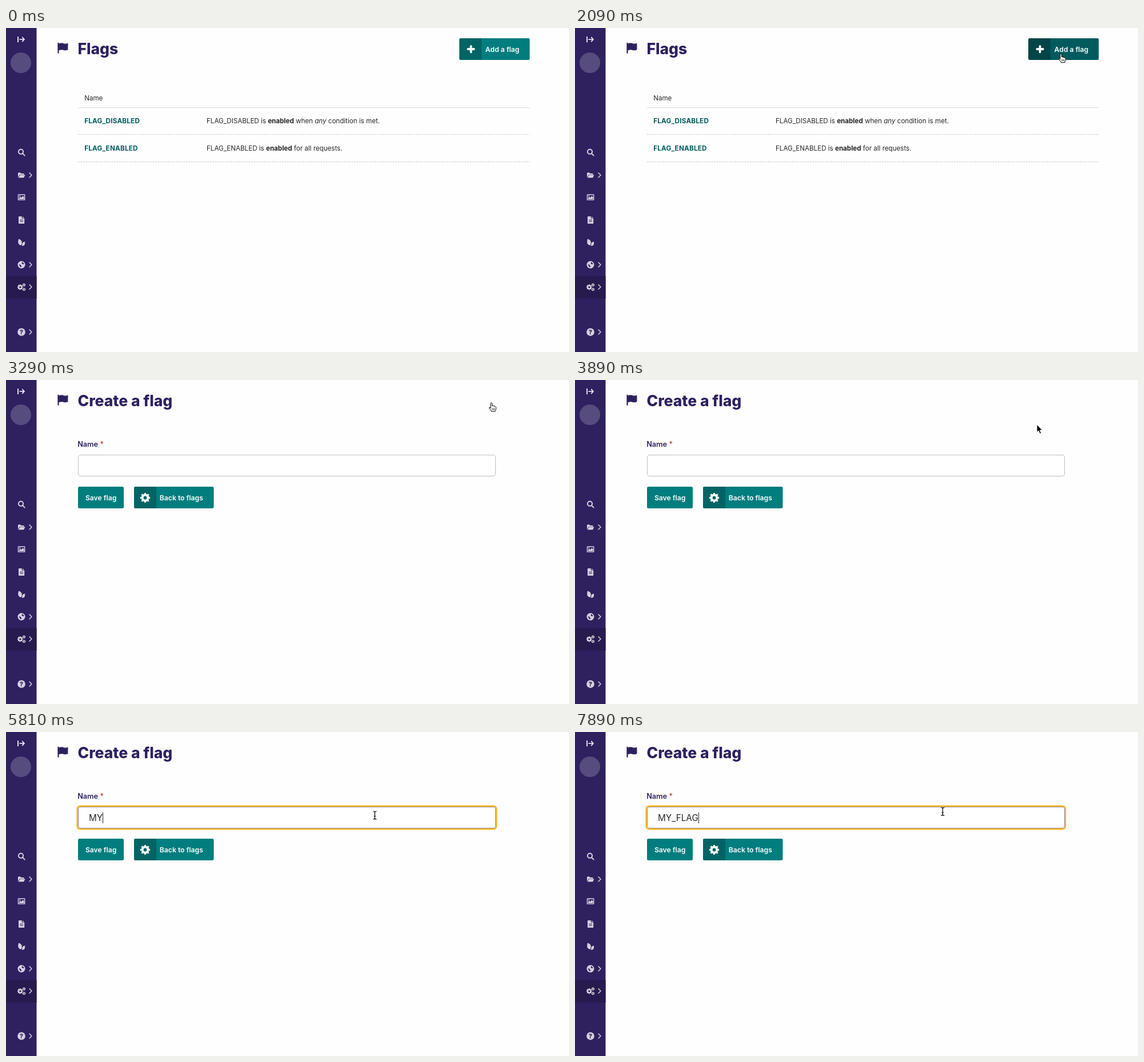
These frames come from a looping animation (985x568 px, 8 s). An HTML page:

```html
<!DOCTYPE html>
<html lang="en">
<head>
<meta charset="utf-8">
<title>Flags</title>
<style>
  html, body { margin: 0; width: 100%; height: 100%; overflow: hidden; background: #fefefe; }
  svg { display: block; }
  text { font: 400 11.6px Inter, sans-serif; fill: #262626; }
  .title { font-size: 26.5px; font-weight: 800; fill: #2f2060; }
  .label { font-size: 12.7px; font-weight: 600; fill: #2f2060; }
  .button text { font-size: 12.2px; font-weight: 600; fill: #fff; }
  .button { fill: #007d7e; }
  .button .tab { fill: #006465; }
  .button.hover { fill: #005b5e; }
  .button.hover .tab { fill: #004547; }
  .link { font-size: 11.7px; font-weight: 700; letter-spacing: .2px; fill: #005b5e; }
  .bold { font-weight: 700; }
  .any { font-style: italic; }
  .typed { font-size: 15.3px; }
  .icons { color: #d5d2df; fill: currentColor; }
  .line { fill: none; stroke: currentColor; stroke-linecap: round; stroke-linejoin: round; }
  .dash { stroke: #c4c4c4; stroke-dasharray: 2.7 1.8; }
  .row { fill: none; }
  .row.hover { fill: #f6f6f8; }
  .field { fill: #fff; stroke: #bdbdbd; }
  .field.hover { stroke: #8c8c8c; }
</style>
</head>
<body>
<svg width="985" height="568" viewBox="0 0 985 568">
  <defs>
    <g id="gear" fill="none" stroke="currentColor">
      <circle r="4.9" stroke-width="4"/>
      <circle r="7" stroke-width="3.2" pathLength="16" stroke-dasharray="1 1" stroke-dashoffset=".5"/>
    </g>
    <path id="chevron" class="line" stroke-width="1.5" d="M-2-4 2 0-2 4"/>
  </defs>

  <rect width="53.5" height="568" fill="#2f2060"/>
  <rect y="435" width="53.5" height="39" fill="#261a4e"/>
  <circle cx="26" cy="61" r="18" fill="#574c7e"/>

  <g class="icons">
    <path class="line" stroke-width="1.7" d="M21 15.5v9M24 20h8M28.7 16.5 32 20l-3.3 3.5" style="color:#fff"/>
    <g class="line" stroke-width="2">
      <circle cx="26" cy="216.8" r="4.1"/>
      <path d="m29.3 220.2 3.4 3.4"/>
    </g>
    <path d="M21 261.5v-7q0-1 1-1h3l1.5 1.5h4q1 0 1 1v1h-7.2ZM24.8 257.5H33.5l-2.4 5H21.5Z"/>
    <path class="line" stroke-width="1.4" d="M21.5 292.2h11.2v9.2H21.5Z"/>
    <path d="M23 300v-2l2-2 1.6 1.5 3-3 2 2V300Z"/>
    <circle cx="24.4" cy="294.8" r="1.1"/>
    <path d="M22 331q0-.7.7-.7h5.2v3.6h4.3v8.4q0 .7-.7.7h-8.8q-.7 0-.7-.7ZM29 330.5l3 2.8h-3Z"/>
    <path stroke="#2f2060" stroke-width="1" d="M24.2 336.7h5.8M24.2 339.2h5.8"/>
    <path d="M22.2 369.8q4.6 1.6 5.6 5 .4 3-1.2 6.2-4.6-.6-5.4-4.8-.2-3.2 1-6.4ZM28.4 377.4q1.8-2.6 4.7-2.8.6 4.4-1 6.2-1.6 1.4-4.4 1 .9-2.4.7-4.4Z"/>
    <circle cx="27" cy="415" r="6.5"/>
    <path fill="#2f2060" d="M28 410.2q2.6.8 3.6 3.2l-2 1-2-1.6ZM23 413.6l2.6 1.8 1.6 2-1 2.4q-3-2-3.2-6.2Z"/>
    <use href="#gear" transform="translate(24.8 454.3) scale(.57)"/>
    <use href="#gear" transform="translate(31.5 450.4) scale(.33)"/>
    <use href="#gear" transform="translate(31.5 458.2) scale(.33)"/>
    <circle cx="27" cy="533" r="6.8"/>
    <text x="27" y="537" text-anchor="middle" style="font-size:11px;font-weight:800;fill:#2f2060">?</text>
    <use href="#chevron" x="43" y="258"/>
    <use href="#chevron" x="43" y="415"/>
    <use href="#chevron" x="43" y="454"/>
    <use href="#chevron" x="43" y="533"/>
  </g>

  <path fill="#2f2060" d="M90.4 26.2q1.1-1.4 2.2 0v1.2q4.2-2 8-.4 3.4 1.4 7.8-.6V38q-4 2.2-7.8.8-3.6-1.4-8 .4V44.6h-2.2Z"/>
  <text id="title" class="title" x="125.5" y="46.4"></text>

  <g id="list">
    <rect id="rowA" class="row" x="126" y="140" width="790.5" height="46.5"/>
    <rect id="rowB" class="row" x="126" y="187" width="790.5" height="47.5"/>
    <path stroke="#d9d9d9" d="M126 139.7H916.5"/>
    <path class="dash" d="M126 186.6H339M339 186.6H916.5M126 234.7H339M339 234.7H916.5"/>
    <text x="137.2" y="127">Name</text>
    <text class="link" x="137.2" y="166.9">FLAG_DISABLED</text>
    <text class="link" x="137.2" y="214.9">FLAG_ENABLED</text>
    <text x="351" y="166.9">FLAG_DISABLED is <tspan class="bold">enabled</tspan> when <tspan class="any">any</tspan> condition is met.</text>
    <text x="351" y="214.9">FLAG_ENABLED is <tspan class="bold">enabled</tspan> for all requests.</text>
    <g id="add" class="button">
      <rect x="793.2" y="18" width="123.1" height="38" rx="2.7"/>
      <path class="tab" d="M832 18v38h-36.1q-2.7 0-2.7-2.7V20.7q0-2.7 2.7-2.7Z"/>
      <path class="line" stroke-width="3.8" d="M808.3 37h10.4M813.5 31.8v10.4" style="color:#fff"/>
      <text x="838.6" y="41.5">Add a flag</text>
    </g>
  </g>

  <g id="form">
    <text class="label" x="125.2" y="116.7">Name <tspan fill="#cd4444">*</tspan></text>
    <rect id="ring" x="124.8" y="129.8" width="733" height="40.4" rx="5" fill="none" stroke="#fbb829" stroke-width="2.8"/>
    <rect id="field" class="field" x="126.5" y="131.5" width="730" height="37" rx="4.2"/>
    <text id="typed" class="typed" x="145" y="156.4"></text>
    <rect id="caret" y="141" width="1" height="19" fill="#262626"/>
    <g class="button">
      <rect x="126" y="187" width="80" height="38" rx="2.7"/>
      <text x="138.9" y="210.7">Save flag</text>
    </g>
    <g class="button">
      <rect x="224" y="187" width="139.5" height="38" rx="2.7"/>
      <path class="tab" d="M263 187v38h-36.3q-2.7 0-2.7-2.7v-32.6q0-2.7 2.7-2.7Z"/>
      <use href="#gear" x="243.5" y="206.5" style="color:#fff"/>
      <text x="268.8" y="210.7">Back to flags</text>
    </g>
  </g>

  <g id="pointer">
    <path id="arrow" stroke="#fff" d="M0 0V13.6L3 10.9 5.3 16.2 7.7 15.2 5.4 10H9.6Z"/>
    <g id="hand" stroke="#000">
      <path fill="#fff" d="M-1.6 9V1Q-1.6-.6-.3-.6T1 1V5Q1.2 4 2.3 4.2T3.5 5.6Q3.7 4.8 4.7 5T5.8 6.4Q6.2 5.8 7 6.2T7.8 7.8V10Q7.8 12 6.4 13V14.6H-.4V13.4Q-2.6 11-4 8.6-4.2 7-3 7T-1.6 9Z"/>
      <path stroke-width=".8" d="M1.2 9v3.2M3.2 9v3.2M5.2 9v3.2"/>
    </g>
    <path id="beam" fill="none" stroke="#000" stroke-width="1.2" d="M-3-7Q0-7 0-5V5Q0 7-3 7M3-7Q0-7 0-5M0 5Q0 7 3 7M-1.6 1.5H1.6"/>
  </g>
</svg>

<script>
const LOOP = 8000;
const $ = id => document.getElementById(id);
const move = (x, y, cursor) => ({ x, y, ...(cursor && { cursor }) });
const type = text => ({ text, caret: true });

// Each step overrides part of the state from its time onwards.
const steps = [
  [0, { page: "list", cursor: "", hover: "", text: "", caret: false, focus: false, x: 0, y: 0 }],
  [750, move(706, 536, "arrow")],
  [900, move(756, 412)],
  [1050, move(803, 306)],
  [1200, move(827, 239)],
  [1500, { ...move(825.5, 188.5), hover: "rowB" }],
  [1640, { ...move(831, 150), hover: "rowA" }],
  [1790, { ...move(840, 103), hover: "" }],
  [1940, move(847, 68)],
  [2090, { ...move(850.5, 46, "hand"), hover: "add" }],
  [2240, move(851, 38.5)],
  [2840, move(850.5, 39)],
  [2990, move(849.5, 40.5)],
  [3290, { page: "form", hover: "" }],
  [3590, move(849, 41, "arrow")],
  [3740, move(838, 52)],
  [3890, move(808, 78)],
  [4030, move(764, 108)],
  [4180, { ...move(714, 133, "beam"), hover: "field" }],
  [4330, move(675, 142)],
  [4470, move(652, 145.5)],
  [4620, move(645.3, 146)],
  [4770, { focus: true, caret: true }],
  [5220, { caret: false }],
  [5520, type("M")],
  [5810, type("MY")],
  [5960, type("MY_")],
  [6100, type("MY_FL")],
  [6250, type("MY_FLA")],
  [6550, type("MY_FLAGS")],
  [7140, { caret: false }],
  [7440, type("MY_FLAG")],
  [7590, move(645, 144.5)],
  [7740, move(644, 142)],
  [7890, move(643.3, 139.5)],
];

const show = (id, on) => { $(id).style.display = on ? "" : "none"; };

function draw(s) {
  $("title").textContent = s.page === "list" ? "Flags" : "Create a flag";
  show("list", s.page === "list");
  show("form", s.page === "form");
  for (const id of ["rowA", "rowB", "add", "field"]) $(id).classList.toggle("hover", s.hover === id);
  for (const id of ["arrow", "hand", "beam"]) show(id, s.cursor === id);
  $("pointer").setAttribute("transform", `translate(${s.x} ${s.y})`);
  show("ring", s.focus);
  show("caret", s.caret);
  $("typed").textContent = s.text;
  const width = s.text && s.page === "form" ? $("typed").getComputedTextLength() : 0;
  $("caret").setAttribute("x", 145 + Math.round(width));
}

let shown = -1;
function tick() {
  const time = performance.now() % LOOP;
  const past = steps.filter(([start]) => start <= time);
  if (past.length !== shown) {
    shown = past.length;
    draw(Object.assign({}, ...past.map(([, change]) => change)));
  }
  requestAnimationFrame(tick);
}
tick();
</script>
</body>
</html>
```
